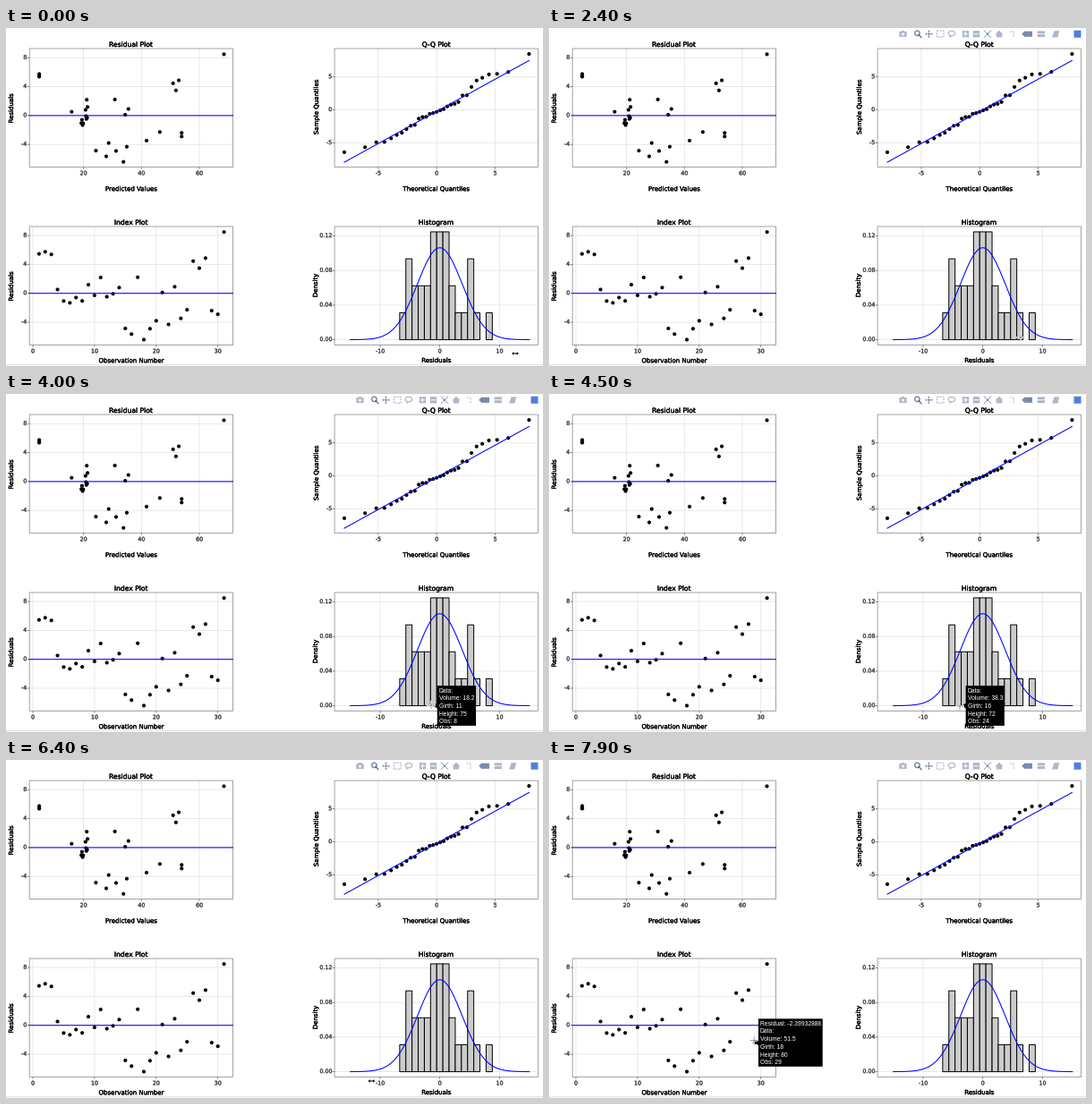
Recreate the animation shown at these times as a matplotlib script. Size 600 by 378 pixels, loop 8000 ms.

```python
import math

import matplotlib.pyplot as plt
import numpy as np
from matplotlib.animation import FuncAnimation
from matplotlib.patches import Circle, Polygon, Rectangle
from matplotlib.patheffects import withStroke

W, H, DPI = 600, 378, 100
PT = 72 / DPI
FRAMES, STEP = 80, 100
plt.rcParams["path.snap"] = False

# residuals of the fit volume = B0 + B1 * girth + B2 * height
resid = np.array([5.46, 5.75, 5.38, 0.523, -1.07, -1.32, -0.59, -1.05, 1.19,
                  -0.29, 2.19, -0.47, -0.07, 0.79, -4.86, -5.65, 2.22, -6.41,
                  -4.9, -3.8, 0.11, -4.31, 0.91, -3.47, -2.28, 4.46, 3.48,
                  4.87, -2.39932888, -2.9, 8.48])
n = len(resid)
obs = np.arange(1, n + 1)
B0, B1, B2 = -57.988, 4.708, 0.339

# fitted values climb between a few bends, heights swing like a wave
bends = [(1, 4.7), (3, 4.7), (4, 15.9), (5, 19.9), (8, 19.25), (9, 21.4),
         (14, 20.7), (16, 27.85), (18, 33.8), (20, 28.7), (21, 34.4),
         (23, 35.5), (24, 41.77), (26, 50.94), (29, 53.9), (30, 53.9),
         (31, 68.5)]
fitted = np.interp(obs, *zip(*bends))
height = np.round(77.7 + 6.7 * np.cos(2 * np.pi * (obs - 27.3) / 8.3))
girth = np.round((fitted - B0 - B2 * height) / B1, 1)
volume = np.round(fitted + resid, 1)

fig = plt.figure(figsize=(W / DPI, H / DPI), dpi=DPI, facecolor="white")
ax = fig.add_axes([0, 0, 1, 1])
ax.set_xlim(0, W)
ax.set_ylim(H, 0)
ax.axis("off")


def line(x, y, color, width=1.0, z=2, **kw):
    return ax.plot(x, y, color=color, lw=width * PT, zorder=z, **kw)[0]


def label(x, y, s, size, color="black", ha="center", va="baseline", **kw):
    heavy = withStroke(linewidth=0.35 * PT, foreground=color)
    return ax.text(x, y, s, fontsize=size * PT, color=color, ha=ha, va=va,
                   family="DejaVu Sans", path_effects=[heavy], **kw)


class Panel:
    def __init__(self, left, top, x_map, y_map):
        self.left, self.right = left, left + 227.3
        self.top, self.bottom = top, top + 132.5
        self.x_map, self.y_map = x_map, y_map

    def x(self, v):
        return self.x_map[0] + self.x_map[1] * np.asarray(v)

    def y(self, v):
        return self.y_map[0] - self.y_map[1] * np.asarray(v)

    def holds(self, x, y):
        return self.left <= x <= self.right and self.top <= y <= self.bottom

    def frame(self, title, x_title, y_title, xticks, yticks, y_fmt="%g",
              x_base=182.2, y_title_at=(6, 90)):
        l, r, t, b = self.left, self.right, self.top, self.bottom
        mid = (l + r) / 2
        for v in xticks:
            x = self.x(v)
            line([x, x], [t, b], "#e4e4e4", 0.8, 1)
            line([x, x], [b, b + 2], "#555555", 0.7)
            label(x, b + 7.4, "%g" % v, 6.3, "#4d4d4d", va="center")
        for v in yticks:
            y = self.y(v)
            line([l, r], [y, y], "#e4e4e4", 0.8, 1)
            line([l - 2, l], [y, y], "#555555", 0.7)
            label(l - 3, y, y_fmt % v, 6.3, "#4d4d4d", "right", "center")
        ax.add_patch(Rectangle((l, t), r - l, b - t, fill=False, ec="#8c8c8c",
                               lw=0.8 * PT, zorder=2))
        label(mid, t - 2, title, 7.6)
        label(mid, x_base, x_title, 7.0)
        label(*y_title_at, y_title, 7.0, va="center", rotation=90)

    def dots(self, xs, ys):
        for x, y in zip(self.x(xs), self.y(ys)):
            ax.add_patch(Circle((x, y), 2.05, fc="black", lw=0, zorder=4))

    def curve(self, xs, ys):
        line(self.x(xs), self.y(ys), "blue", 1.05, 5)

    def zero_line(self):
        line([self.left, self.right], [self.y(0)] * 2, "blue", 1.05, 5)


def residual_plot():
    p = Panel(26.2, 23, (21.9, 3.235), (97.9, 8.08))
    p.frame("Residual Plot", "Predicted Values", "Residuals",
            range(20, 61, 20), range(-4, 9, 4))
    p.dots(fitted, resid)
    p.zero_line()


def qq_plot():
    p = Panel(367.1, 23, (481.2, 13.06), (91.6, 7.38))
    p.frame("Q-Q Plot", "Theoretical Quantiles", "Sample Quantiles",
            (-5, 0, 5), (-5, 0, 5), y_title_at=(347, 88.5))
    z = np.linspace(-3, 3, 601)
    cdf = [0.5 + 0.5 * math.erf(v / math.sqrt(2)) for v in z]
    theory = resid.std() * np.interp((obs - 0.5) / n, cdf, z)
    lo, hi = np.percentile(resid, [25, 75])
    slope = (hi - lo) / (2 * 0.6745 * resid.std())
    p.dots(theory, np.sort(resid))
    p.curve(theory, (lo + hi) / 2 + slope * theory)


def index_plot():
    p = Panel(26.2, 222, (30, 6.89), (296.7, 8.08))
    p.frame("Index Plot", "Observation Number", "Residuals",
            range(0, 31, 10), range(-4, 9, 4), x_base=374.3,
            y_title_at=(6, 289))
    p.dots(obs, resid)
    p.zero_line()
    return p


def histogram():
    p = Panel(367.1, 222, (484.7, 6.67), (348.6, 967))
    p.frame("Histogram", "Residuals", "Density", (-10, 0, 10),
            (0, 0.04, 0.08, 0.12), "%.2f", 374, (346, 288))
    edges = (np.arange(16) - 6.5) * 1.0343
    density, _ = np.histogram(resid, edges, density=True)
    for a, b, d in zip(edges, edges[1:], density):
        if d:
            ax.add_patch(Rectangle((p.x(a), p.y(d)), p.x(b) - p.x(a),
                                   p.y(0) - p.y(d), fc="#cccccc", ec="black",
                                   lw=PT, zorder=3))
    v = np.linspace(-15, 15, 200)
    sd = resid.std(ddof=1)
    p.curve(v, np.exp(-0.5 * (v / sd) ** 2) / (sd * math.sqrt(2 * math.pi)))
    return p


def toolbar():
    """Icons at the top right; returns (artist, full alpha) pairs."""
    ink, soft, strong, mid = "#001f5f", 0.32, 0.52, 6.7
    out = []

    def add(patch, a):
        out.append((ax.add_patch(patch), a))

    def box(x, y, w, h, a=soft, color=ink):
        add(Rectangle((x - w / 2, y - h / 2), w, h, fc=color, lw=0), a)

    def poly(pts, a=soft):
        add(Polygon(pts, fc=ink, lw=0), a)

    def stroke(xs, ys, a=soft, w=1.2, color=ink, **kw):
        out.append((line(xs, ys, color, w, **kw), a))

    def tag(x, y, w, h, a=soft):
        poly([(x, y), (x + h / 2, y - h / 2), (x + w, y - h / 2),
              (x + w, y + h / 2), (x + h / 2, y + h / 2)], a)

    # camera
    box(395.5, 7, 8.4, 5.8)
    box(395.5, 3.6, 3.4, 1.2)
    add(Circle((395.5, 7), 1.7, fc="white", lw=0), 0.8)
    # zoom
    add(Circle((411.4, 5.8), 2.7, fill=False, ec=ink, lw=1.5 * PT), strong)
    stroke([413.4, 415.8], [7.8, 10.4], strong, 1.7)
    # pan
    for dx, dy in ((1, 0), (-1, 0), (0, 1), (0, -1)):
        x, y = 424.5 + 4.4 * dx, mid + 4.4 * dy
        stroke([424.5, x - dx], [mid, y - dy])
        poly([(x, y), (x - 1.8 * dx + 1.6 * dy, y - 1.8 * dy + 1.6 * dx),
              (x - 1.8 * dx - 1.6 * dy, y - 1.8 * dy - 1.6 * dx)])
    # box select and lasso
    add(Rectangle((433.5, 3.2), 7.5, 7, fill=False, ec=ink, lw=1.2 * PT,
                  ls=(0, (1.6, 1))), soft)
    a = np.linspace(0.6, 2.7, 40) * math.pi
    stroke(450 + 3.8 * np.cos(a), 6 + 2.7 * np.sin(a) + (a > 8) * (a - 8) * 4)
    # zoom in and out
    for x in (465.5, 477.5):
        box(x, mid, 7.4, 7.4)
        stroke([x - 2.2, x + 2.2], [mid, mid], 0.9, 1.1, "white")
    stroke([465.5] * 2, [mid - 2.2, mid + 2.2], 0.9, 1.1, "white")
    # autoscale
    for sx in (-1, 1):
        for sy in (-1, 1):
            stroke([490, 490 + 3.7 * sx], [mid, mid + 3.7 * sy])
    # home
    poly([(498.6, mid + 0.5), (503, 2.6), (507.4, mid + 0.5)])
    box(503, 8.8, 6.4, 3.2)
    # spike lines
    stroke([514.8, 519, 519], [4, 4, 10.5], w=1, ls=(0, (1.8, 1)))
    # hover modes
    tag(528.2, mid, 11.8, 6.2, strong)
    tag(545, mid - 1.9, 9, 3)
    tag(545, mid + 1.9, 9, 3)
    # sheet
    poly([(562, 10.4), (564.6, 3.2), (570.2, 3.2), (568.4, 10.4)])
    # brand spot
    box(590.5, mid, 8, 8, 0.95, "#447adb")
    return out


residual_plot()
qq_plot()
index = index_plot()
hist = histogram()
icons = toolbar()
line([0, W], [376.8, 376.8], "#d4d4d4", 0.8, 1)

# hover label
tip_box = ax.add_patch(Polygon([(0, 0)] * 3, fc="black", lw=0, zorder=8))
tip_rows = [ax.text(0, 0, "", fontsize=6.73 * PT, color="white",
                    family="Liberation Sans", zorder=9) for _ in range(6)]

# pointers
half = [(-4.2, 0), (-1.6, -2.6), (-1.6, -0.9), (1.6, -0.9), (1.6, -2.6)]
RESIZE = np.array(half + [(-x, -y) for x, y in half])
ARROW = np.array([(0, 0), (0, 8), (2, 6.3), (5.6, 5.8)])
pointer = ax.add_patch(Polygon(RESIZE, fc="black", ec="white", lw=0.6 * PT,
                               zorder=12))
cross = [line([], [], c, w, 11) for c, w in (("white", 1.8),
                                             ("#777777", 0.7))]

# pointer path: time, x, y
PATH = [(0, 569, 364), (1400, 545.5, 346), (3100, 514, 346),
        (3200, 505, 346), (4000, 475, 348), (4500, 459, 349),
        (6400, 408.5, 359), (7200, 231, 316), (7900, 229.2, 313.5)]
REACH = 5


def cursor(t):
    ts, xs, ys = zip(*PATH)
    return np.interp(t, ts, xs), np.interp(t, ts, ys)


def hovered(t):
    """Anchor and text of the point near the pointer, one step late."""
    x, y = cursor(max(t - STEP, 0))
    if hist.holds(x, y):
        xs, ys = hist.x(resid), np.full(n, hist.y(0))
        dist = np.abs(xs - x)
    elif index.holds(x, y):
        xs, ys = index.x(obs), index.y(resid)
        dist = np.hypot(xs - x, ys - y)
    else:
        return None
    k = int(np.argmin(dist))
    if dist[k] > REACH:
        return None
    rows = ["Data:", "Volume: %g" % volume[k], "Girth: %g" % girth[k],
            "Height: %g" % height[k], "Obs: %d" % obs[k]]
    if x < index.right:
        rows.insert(0, "Residual: %.8f" % resid[k])
    return xs[k], ys[k], rows


def draw_tip(t):
    hit = hovered(t)
    tip_box.set_visible(hit is not None)
    for row in tip_rows:
        row.set_text("")
    if hit is None:
        return
    x, y, rows = hit
    pitch, left = 8.75, x + 4.1
    tall = (len(rows) * pitch + 1) / 2
    width = 0
    for i, (row, s) in enumerate(zip(tip_rows, rows)):
        row.set_text(s)
        row.set_position((left + 2, y + (i - (len(rows) - 1) / 2) * pitch
                          + 2.4))
        width = max(width, row.get_window_extent().width)
    right = left + width + 3.8
    tip_box.set_xy([(x, y), (left, y - 3), (left, y - tall),
                    (right, y - tall), (right, y + tall), (left, y + tall),
                    (left, y + 3)])


def draw_cursor(t):
    x, y = cursor(t)
    inside = hist.holds(x, y) or index.holds(x, y)
    pointer.set_visible(not inside)
    shape = RESIZE if hist.left < x < hist.right else ARROW
    pointer.set_xy(shape + (x, y))
    for c in cross:
        c.set_visible(inside)
        c.set_data([x - 4, x + 4, np.nan, x, x], [y, y, np.nan, y - 4, y + 4])


def update(frame):
    t = frame * STEP
    shown = min(max((t - 300) / 300, 0), 1)
    for art, alpha in icons:
        art.set_alpha(alpha * shown)
    draw_tip(t)
    draw_cursor(t)
    return []


# the label stays away until the pointer has crossed the last bar
REACH = 5
anim = FuncAnimation(fig, update, frames=FRAMES, interval=STEP, repeat=True,
                     repeat_delay=0, blit=False)
plt.show()
```
